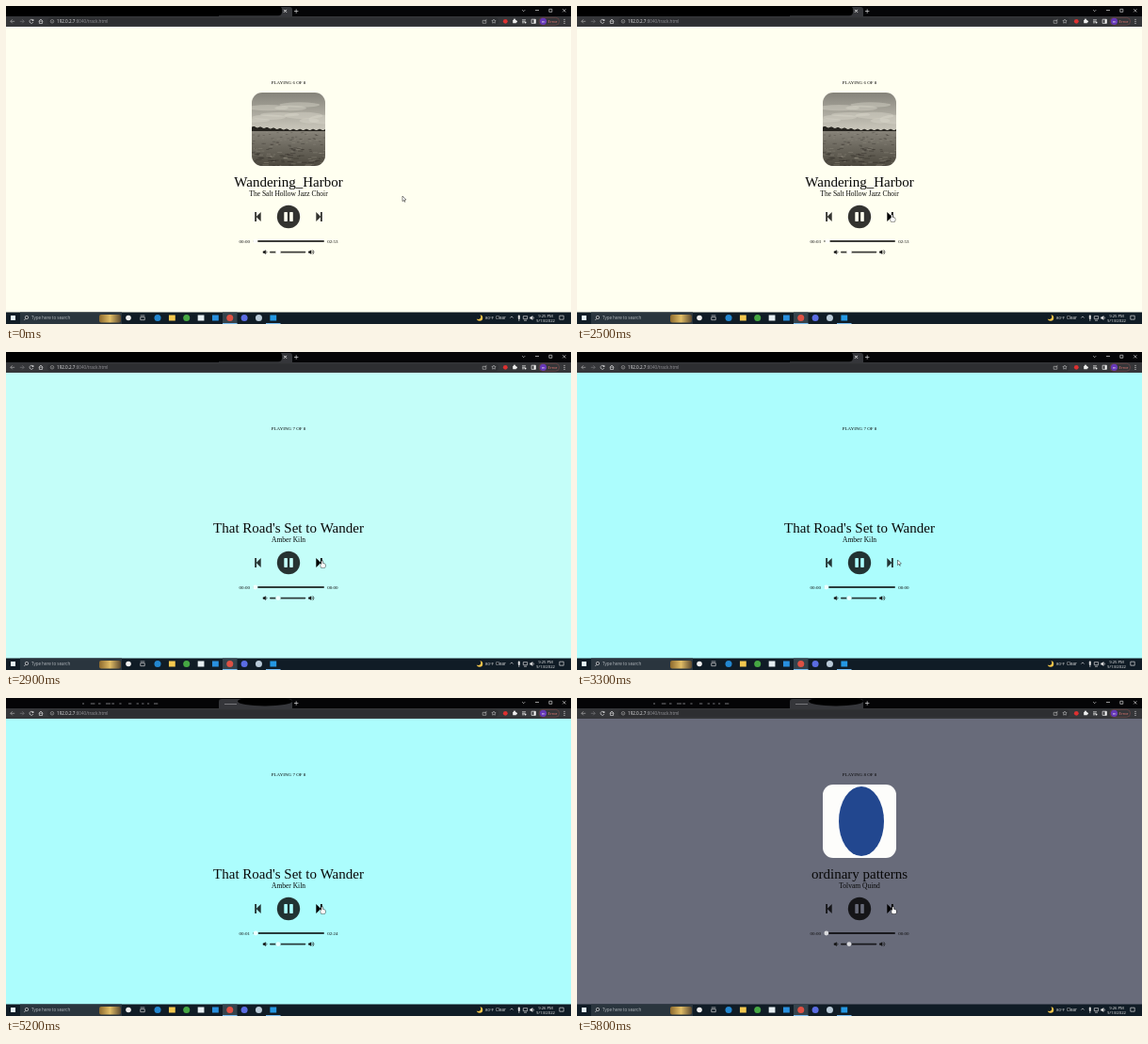
Write an HTML page with a canvas that moves like this. It is 600 px wide and 338 px high and loops after 5.9 s.

```html
<!DOCTYPE html>
<html lang="en">
<head>
<meta charset="utf-8">
<title>Music player</title>
<style>
html, body { margin: 0; width: 100%; height: 100%; overflow: hidden; background: #fffff0; }
canvas { display: block; width: 600px; height: 338px; }
</style>
</head>
<body>
<canvas id="stage" width="600" height="338"></canvas>
<script>
const ctx = document.getElementById('stage').getContext('2d');
const LOOP = 5900, STEP = 100;
const SERIF = '"Liberation Serif", "Times New Roman", serif';
const SANS = '"Open Sans", "Noto Sans", sans-serif';
const INK = '#d4d4d6', SOFT = 'rgba(0,0,0,.8)';

const songs = [
  { title: 'Wandering_Harbor', artist: 'The Salt Hollow Jazz Choir', bg: [255, 255, 240] },
  { title: "That Road's Set to Wander", artist: 'Amber Kiln', bg: [172, 253, 253] },
  { title: 'ordinary patterns', artist: 'Tolvam Quind', bg: [104, 107, 122] }
];

// pointer stops: time, x, y
const stops = [
  [0, 421, 202], [300, 477, 178], [600, 377, 156], [1400, 300, 4],
  [2200, 333, 222], [2900, 335, 222], [3300, 340.5, 221]
];

const clamp = v => Math.max(0, Math.min(1, v));
const mix = (a, b, p) => a + (b - a) * p;

// CSS "ease" curve, solved by bisection
function ease(x) {
  if (x <= 0 || x >= 1) return clamp(x);
  const bez = (a, b, u) => 3 * a * u * (1 - u) ** 2 + 3 * b * u * u * (1 - u) + u ** 3;
  let lo = 0, hi = 1;
  for (let i = 0; i < 20; i++) {
    const mid = (lo + hi) / 2;
    if (bez(.25, .25, mid) < x) lo = mid; else hi = mid;
  }
  return bez(.1, 1, lo);
}

function random(seed) {
  return () => (seed = (seed * 16807) % 2147483647) / 2147483647;
}

function rect(x, y, w, h, color) {
  ctx.fillStyle = color;
  ctx.fillRect(x, y, w, h);
}

function round(x, y, w, h, r, color) {
  ctx.fillStyle = color;
  ctx.beginPath();
  ctx.roundRect(x, y, w, h, r);
  ctx.fill();
}

function oval(x, y, rx, ry, color) {
  ctx.fillStyle = color;
  ctx.beginPath();
  ctx.ellipse(x, y, rx, ry, 0, 0, 7);
  ctx.fill();
}

const disc = (x, y, r, color) => oval(x, y, r, r, color);

function trace(pts) {
  ctx.beginPath();
  for (let i = 0; i < pts.length; i += 2) ctx.lineTo(pts[i], pts[i + 1]);
}

function poly(pts, color) {
  trace(pts);
  ctx.fillStyle = color;
  ctx.fill();
}

function stroke(color = INK, w = .7) {
  ctx.strokeStyle = color;
  ctx.lineWidth = w;
  ctx.stroke();
}

function line(pts, color, w) {
  trace(pts);
  stroke(color, w);
}

function arc(x, y, r, from = 0, to = 7, color, w) {
  ctx.beginPath();
  ctx.arc(x, y, r, from, to);
  stroke(color, w);
}

// outlined box around a centre
function box(x, y, w, h, r = 0, color, lw) {
  ctx.beginPath();
  ctx.roundRect(x - w / 2, y - h / 2, w, h, r);
  stroke(color, lw);
}

// open V whose point lies r from the centre in direction (dx, dy)
function chevron(x, y, dx, dy, r, color) {
  line([x - r * dy, y - r * dx, x + r * dx, y + r * dy, x + r * dy, y + r * dx], color);
}

function cross(x, y, r) {
  line([x - r, y - r, x + r, y + r]);
  line([x - r, y + r, x + r, y - r]);
}

function text(str, x, y, size, color, family = SANS, align = 'left') {
  ctx.font = size + 'px ' + family;
  ctx.textAlign = align;
  ctx.fillStyle = color;
  ctx.fillText(str, x, y);
  return ctx.measureText(str).width;
}

function tabs(second) {
  rect(0, 0, 600, 11, '#050507');
  round(226, 1, 78, 10, [3, 3, 0, 0], '#35363a');
  if (second) {
    const rnd = random(21);
    for (let x = 81; x < 160; x += 5 + 5 * rnd()) rect(x, 5.5, 2 + 3 * rnd(), 1, '#77777b');
    rect(232, 6, 13, 1, '#77777b');
    oval(275, 3.5, 29, 5, '#000');
  } else {
    cross(296.5, 5.3, 1.4);
    round(0, 0, 293, 10.3, 4, '#000');
    oval(80, 9, 30, 3.5, '#000');
    cross(296.5, 5.3, 1.4);
  }
  line([306, 5.5, 310.4, 5.5]);
  line([308.2, 3.3, 308.2, 7.7]);
  chevron(549.7, 4.2, 0, 1, 1.5);
  line([562, 4.5, 566, 4.5]);
  box(578.3, 4.8, 3, 3);
  cross(592.8, 4.8, 1.6);
}

function star(x, y, r) {
  const pts = [];
  for (let i = 0; i <= 10; i++) {
    const a = i * Math.PI / 5 - Math.PI / 2, d = i % 2 ? r / 2 : r;
    pts.push(x + d * Math.cos(a), y + d * Math.sin(a));
  }
  line(pts, INK, .5);
}

function toolbar() {
  const y = 16.3;
  rect(0, 11, 600, 11, '#353639');
  for (const [x, dir, color] of [[7, -1, '#aaa'], [17, 1, '#77777b']]) {
    line([x - 2.2, y, x + 2.2, y], color);
    chevron(x + dir * .2, y, dir, 0, 2, color);
  }
  arc(27, y, 2, .4, 5.6);
  rect(27.6, y - 2, 1.8, 1.6, INK);
  chevron(37, y, 0, -1, 2.3);
  box(37, y + 1, 3.2, 2.4);

  round(44, 12.4, 479, 7.8, 3.9, '#2d2e31');
  arc(49, y, 1.8, 0, 7, '#aaa', .6);
  line([49, y - .3, 49, y + 1], '#aaa', .6);
  const w = text('192.0.2.7', 54, 18, 4.6, '#e8e8ea');
  text(':8040/track.html', 54 + w, 18, 4.6, '#939398');
  box(508, y + .5, 3.6, 3, 0, '#bbb', .6);
  line([508, y, 510.5, y - 2], '#bbb', .6);
  star(518, y, 2.3);

  disc(530.3, y, 2.4, '#dc3030');
  round(538.2, 14.7, 3.6, 3.6, .5, '#eee');
  disc(540, 14.5, 1, '#eee');
  disc(542, 16.5, 1, '#eee');
  for (let i = 0; i < 3; i++) {
    line([548, y + 1.5 * (i - 1), 552 - i, y + 1.5 * (i - 1)], '#eee');
    disc(593, y + 2 * (i - 1), .6, '#ddd');
  }
  disc(551.5, 17.5, 1, '#eee');
  box(560.2, y, 4.2, 4.2, 0, '#eee');
  rect(560.5, 14.2, 2, 4.2, '#eee');
  box(576.8, y, 21.5, 8, 4, '#8a4f4c', .5);
  disc(570.5, y, 3.6, '#6637b8');
  text('m', 570.5, 17.6, 4, '#eee', SANS, 'center');
  text('Error', 575.6, 17.9, 4.2, '#ee7b72');
}

function speaker(x, y, waves, color) {
  rect(x, y - 1, 1.5, 2, color);
  poly([x, y, x + 3, y - 2.4, x + 3, y + 2.4], color);
  for (let i = 1; i <= waves; i++) arc(x + 2.6, y, i * 1.5, -.85, .85, color);
}

function taskbar(time) {
  const y = 331.5, top = 325.5, bar = '#101c26';
  rect(0, top, 600, 13, bar);
  rect(5, 329, 5, 5, '#e3f1f8');
  rect(15, top, 108, 13, '#2a353e');
  arc(22, 331, 1.7);
  line([20.8, 332.3, 19.3, 334]);
  text('Type here to search', 27, 333.3, 4.5, '#b5babf');
  const glow = ctx.createLinearGradient(99, 0, 122, 0);
  ['#8d6a2e', '#e1bd66', '#5d4a30'].forEach((c, i) => glow.addColorStop(i / 2, c));
  round(99, 328, 23, 8.5, 2, glow);

  disc(130, y, 2.8, '#eee');
  box(145, y + .7, 4.5, 3);
  line([142.7, 329, 147.3, 329]);
  rect(230, top, 15.5, 13, '#35434c');
  for (const x of [230, 276]) rect(x, 337, 15.5, 1, '#76b9ed');
  const apps = ['#2387d0', '#f3c84f', '#46a843', '#e5eef2', '#2990df', '#dd5144', '#5b6ce2', '#b9cad8', '#2498e3'];
  apps.forEach((color, i) => {
    const x = 161 + 15.35 * i;
    if ([1, 3, 4, 8].includes(i)) rect(x - 3.4, y - 3, 6.8, 6, color);
    else disc(x, y, 3.5, color);
  });

  disc(503, y, 3.2, '#f4c64b');
  disc(501.5, y - 1.3, 2.7, bar);
  text('80°F', 509, 333.3, 4.3, '#e6e6e6');
  text('Clear', 520, 333.3, 4.5, '#e6e6e6');
  chevron(537, y, 0, -1, 1.6);
  round(543.8, 328.5, 2, 4.4, 1, '#ddd');
  line([544.8, 332, 544.8, 335]);
  box(551.5, y - .3, 4.4, 3);
  line([550, 334.2, 553, 334.2]);
  speaker(556.3, y, 1, '#ddd');
  text(time, 573, 330.6, 4.2, '#eee', SANS, 'center');
  text('9/13/2022', 573, 336.2, 4.2, '#eee', SANS, 'center');
  box(590, y - .3, 4.4, 4);
}

function fade(y0, y1, from, to) {
  const g = ctx.createLinearGradient(0, y0, 0, y1);
  g.addColorStop(0, from);
  g.addColorStop(1, to);
  rect(261, y0, 78, y1 - y0, g);
}

function lake() {
  const rnd = random(83);
  fade(92, 132, '#85837a', '#cbc8bc');
  for (let i = 0; i < 9; i++)
    oval(261 + 78 * rnd(), 105 + 18 * rnd(), 9 + 14 * rnd(), 2 + 3 * rnd(), 'rgba(220,217,206,.4)');
  fade(132, 170, '#88847a', '#4c483e');
  for (let i = 0; i < 170; i++) {
    const d = rnd(), y = 134 + 36 * d;
    rect(259 + 80 * rnd(), y, 2 + 6 * d * rnd(), .5 + .5 * d,
      rnd() < .55 ? 'rgba(38,35,29,.45)' : 'rgba(168,163,149,.35)');
  }
  // tree line thins out to the right
  for (let x = 0; x < 78; x++) {
    const h = 1.6 + 3 * clamp(1 - x / 40) + .6 * Math.sin(x * .9);
    rect(261 + x, 133 - h, 1, h, '#26241f');
  }
}

function cover(index) {
  if (index === 1) return;
  ctx.save();
  ctx.beginPath();
  ctx.roundRect(261, 92, 78, 78, 11);
  ctx.clip();
  if (index === 0) lake();
  else {
    rect(261, 92, 78, 78, '#fdfdfb');
    oval(302, 131, 24, 37, '#22478f');
  }
  ctx.restore();
}

function skip(x, dir, color) {
  poly([x - 3 * dir, 219, x + 2 * dir, 224, x - 3 * dir, 229], color);
  rect(x + 2.6 * dir - .9, 219, 1.8, 10, color);
}

function slider(x, y, w, knob, bg) {
  round(x, y - .9, w, 1.8, .9, 'rgba(0,0,0,.76)');
  disc(knob, y, 2.6, bg);
  disc(knob, y, 2.4, 'rgba(255,255,255,.75)');
}

function player(index, bg, secs, total, hover) {
  const mid = (s, y, size) => text(s, 300, y, size, '#080808', SERIF, 'center');
  mid(`PLAYING ${index + 6} OF 8`, 82.7, 5);
  cover(index);
  mid(songs[index].title, 191.7, 15);
  mid(songs[index].artist, 201.5, 7.5);
  skip(267.7, -1, SOFT);
  skip(332.3, 1, hover ? '#000' : SOFT);
  disc(300, 224, 12.2, SOFT);
  for (const x of [295.3, 301.2]) round(x, 219, 3.6, 10, .7, bg);
  text('00:0' + secs, 247.6, 251.6, 5, '#111', SERIF);
  text(total, 341.2, 251.6, 5, '#111', SERIF);
  slider(262.3, 250, 75.7, 264.8 + secs * .4, bg);
  slider(280, 261.6, 38.3, 289, bg);
  speaker(272.8, 261.6, 1, '#111');
  speaker(321.2, 261.6, 2, '#111');
}

function pointer(x, y, hand) {
  ctx.save();
  ctx.translate(x, y);
  if (hand) {
    for (const [color, pad] of [['#111', .4], ['#fff', 0]]) {
      round(-pad, -pad, 1.3 + 2 * pad, 5 + 2 * pad, .6, color);
      round(-.8 - pad, 2.8 - pad, 4.8 + 2 * pad, 4.4 + 2 * pad, 1.5, color);
    }
  } else {
    const shape = [0, 0, 0, 5.6, 1.3, 4.4, 2.6, 6.4, 2.2, 4.1, 3.9, 4, 0, 0];
    poly(shape, '#fff');
    line(shape, '#111', .5);
  }
  ctx.restore();
}

function tip(t) {
  let i = 1;
  while (i < stops.length - 1 && t > stops[i][0]) i++;
  const [t0, x0, y0] = stops[i - 1], [t1, x1, y1] = stops[i];
  const p = clamp((t - t0) / (t1 - t0));
  return [mix(x0, x1, p), mix(y0, y1, p)];
}

function draw(t) {
  const late = t >= 3800;
  const index = t < 2800 ? 0 : t < 5300 ? 1 : 2;
  const blend = ease((t - (late ? 5230 : 2690)) / 500);
  const from = songs[late ? 1 : 0].bg, to = songs[late ? 2 : 1].bg;
  const bg = `rgb(${from.map((v, i) => Math.round(mix(v, to[i], blend))).join()})`;

  const secs = index === 0 ? Math.min(3, Math.floor((t + 600) / 1000)) : index === 1 && t >= 4800 ? 1 : 0;
  const total = index === 0 ? '02:53' : index === 1 && late ? '02:24' : '00:00';
  const [x, y] = late ? [335, 222] : tip(t);
  const hand = Math.abs(x - 333) < 5 && Math.abs(y - 224) < 6;

  rect(0, 0, 600, 338, bg);
  player(index, bg, secs, total, hand);
  tabs(late);
  toolbar();
  taskbar(late ? '9:26 PM' : '9:25 PM');
  pointer(x, y, hand);
}

const start = performance.now();
function tick() {
  const t = (performance.now() - start) % LOOP;
  draw(Math.floor(t / STEP) * STEP);
  requestAnimationFrame(tick);
}
tick();
</script>
</body>
</html>
```
